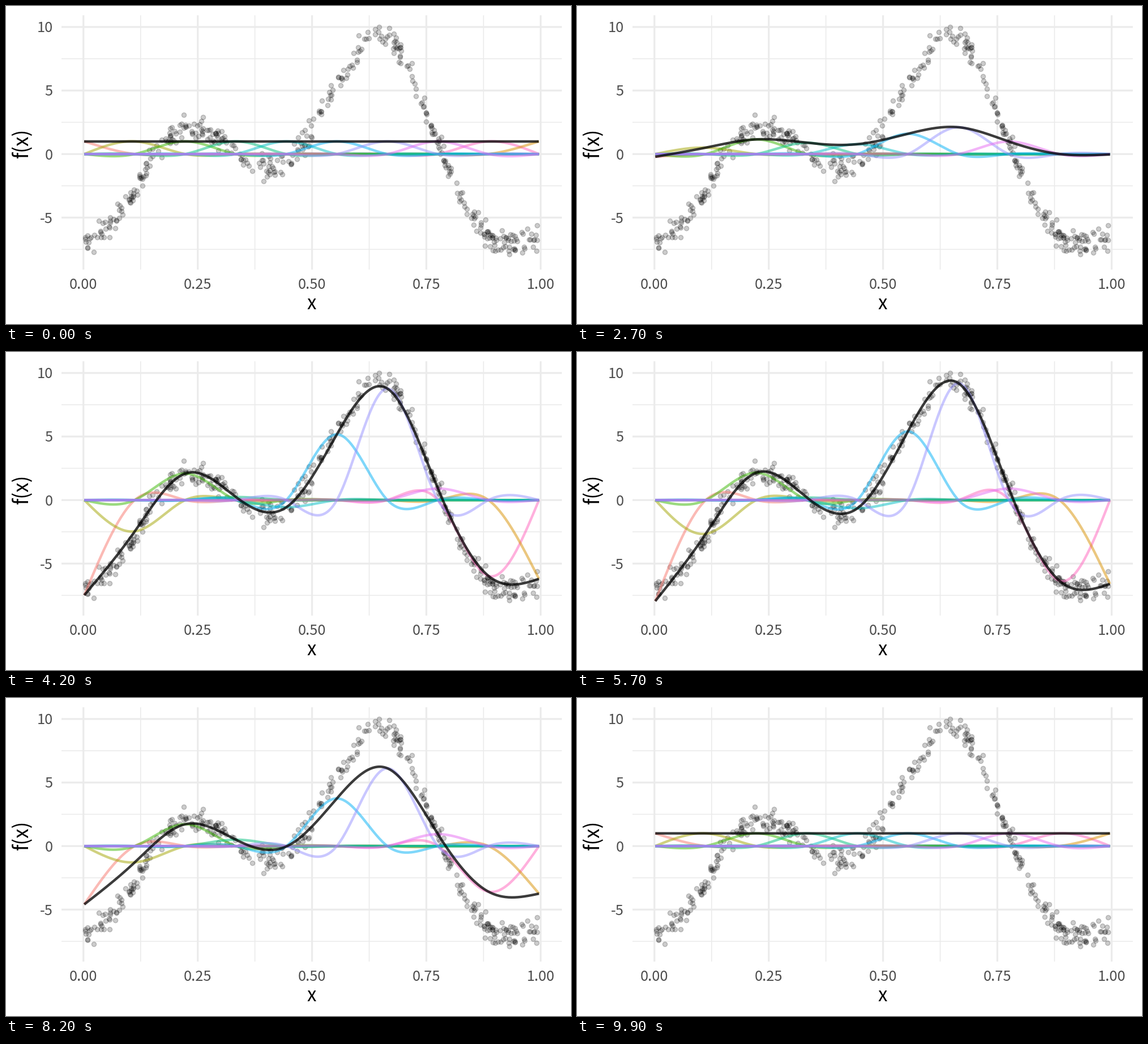
Recreate the animation shown at these times as a matplotlib script. Size 998 by 561 pixels, loop 10000 ms.

```python
import numpy as np
import matplotlib.pyplot as plt
from matplotlib.animation import FuncAnimation

W, H, DPI = 998, 561, 64
PX = 72 / DPI  # points per pixel
FRAMES = 100
FONT = "Noto Sans CJK JP"


def sx(x):
    return 136.8 + 807.6 * np.asarray(x)


def sy(y):
    return 261.2 - 22.42 * np.asarray(y)


def natural_basis(k, x):
    """Natural cubic spline basis: column j is 1 at knot j and 0 at the others."""
    n, h = len(k), k[1] - k[0]
    a, b = np.eye(n), np.zeros((n, n))
    for i in range(1, n - 1):
        a[i, i - 1:i + 2] = 1, 4, 1
        b[i, i - 1:i + 2] = 6, -12, 6
    m = np.linalg.solve(a, b)
    v = np.eye(n)
    j = np.clip(((x - k[0]) / h).astype(int), 0, n - 2)
    t = ((x - k[j]) / h)[:, None]
    s = 1 - t
    return s * v[j] + t * v[j + 1] + ((s**3 - s) * m[j] + (t**3 - t) * m[j + 1]) / 6


knots = np.linspace(.0018, .9963, 10)
fitted = np.array([-7.95, -2.65, 2.15, .2, -.65, 5.4, 9.2, .9, -6.35, -6.6])
grid = np.linspace(knots[0], knots[-1], 300)
basis = natural_basis(knots, grid)
colors = ["#F8766D", "#A3A500", "#39B600", "#00BF7D", "#00BFC4",
          "#00B0F6", "#9590FF", "#E76BF3", "#FF62BC", "#D89000"]


def samples(n=420):
    """Noisy observations around the fit, which misses a small wiggle on the left."""
    rng = np.random.default_rng(12)
    x = rng.uniform(knots[0], knots[-1], n)
    wiggle = .8 * np.cos(2 * np.pi * x / .16) * np.exp(-x / .15)
    noise = np.clip(rng.normal(0, .5, n), -1.1, 1.1)
    return x, np.clip(natural_basis(knots, x) @ fitted + wiggle + noise, -8.2, 10)


fig = plt.figure(figsize=(W / DPI, H / DPI), dpi=DPI, facecolor="white")
ax = fig.add_axes([0, 0, 1, 1])
ax.set(xlim=(0, W), ylim=(H, 0))
ax.axis("off")


def rules(xs, ys, width):
    style = dict(color="#EBEBEB", lw=width * PX, zorder=1, snap=False)
    ax.vlines(sx(xs), 16.4, 465, **style)
    ax.hlines(sy(ys), 98, 981.8, **style)


def label(x, y, s, size, color="#4D4D4D", **kw):
    ax.text(x, y, s, fontsize=size * PX, color=color, family=FONT, va="baseline", **kw)


x_ticks = np.arange(0, 1.1, .25)
y_ticks = np.arange(-5, 11, 5)
rules(x_ticks[:-1] + .125, np.arange(-7.5, 8, 5), 1.6)
rules(x_ticks, y_ticks, 3.2)
for v in x_ticks:
    label(sx(v), 499.3, f"{v:.2f}", 25.5, ha="center")
for v in y_ticks:
    label(82.8, sy(v) + 9.3, str(v), 25.5, ha="right")
label(540, 535, "x", 33, "black", ha="center")
label(39, 242, "f(x)", 35, "black", ha="center", rotation=90, rotation_mode="anchor")

px, py = samples()
ax.scatter(sx(px), sy(py), s=(8.14 * PX)**2, facecolor=(0, 0, 0, .2),
           edgecolor=(0, 0, 0, .2), linewidth=1.48 * PX, zorder=2)


def curve(color, alpha):
    return ax.plot([], [], color=color, alpha=alpha, lw=4.45 * PX, zorder=3,
                   solid_capstyle="butt", solid_joinstyle="round")[0]


# the last two functions lie beneath the others
parts = {k: curve(colors[k], .5) for k in (8, 9, *range(8))}
total = curve("black", .77)


def ease(t):
    t = min(max(t, 0), 1)
    return 4 * t**3 if t < .5 else 1 - 4 * (1 - t)**3


def update(i):
    # hold, rise to the fit, hold, fall back
    p = ease((i - 16) / 34) - ease((i - 67) / 33)
    curves = basis * (1 + p * (fitted - 1))
    for k, line in parts.items():
        line.set_data(sx(grid), sy(curves[:, k]))
    total.set_data(sx(grid), sy(curves.sum(axis=1)))
    return [*parts.values(), total]


anim = FuncAnimation(fig, update, frames=FRAMES, interval=100, repeat=True, repeat_delay=0)
plt.show()
```
